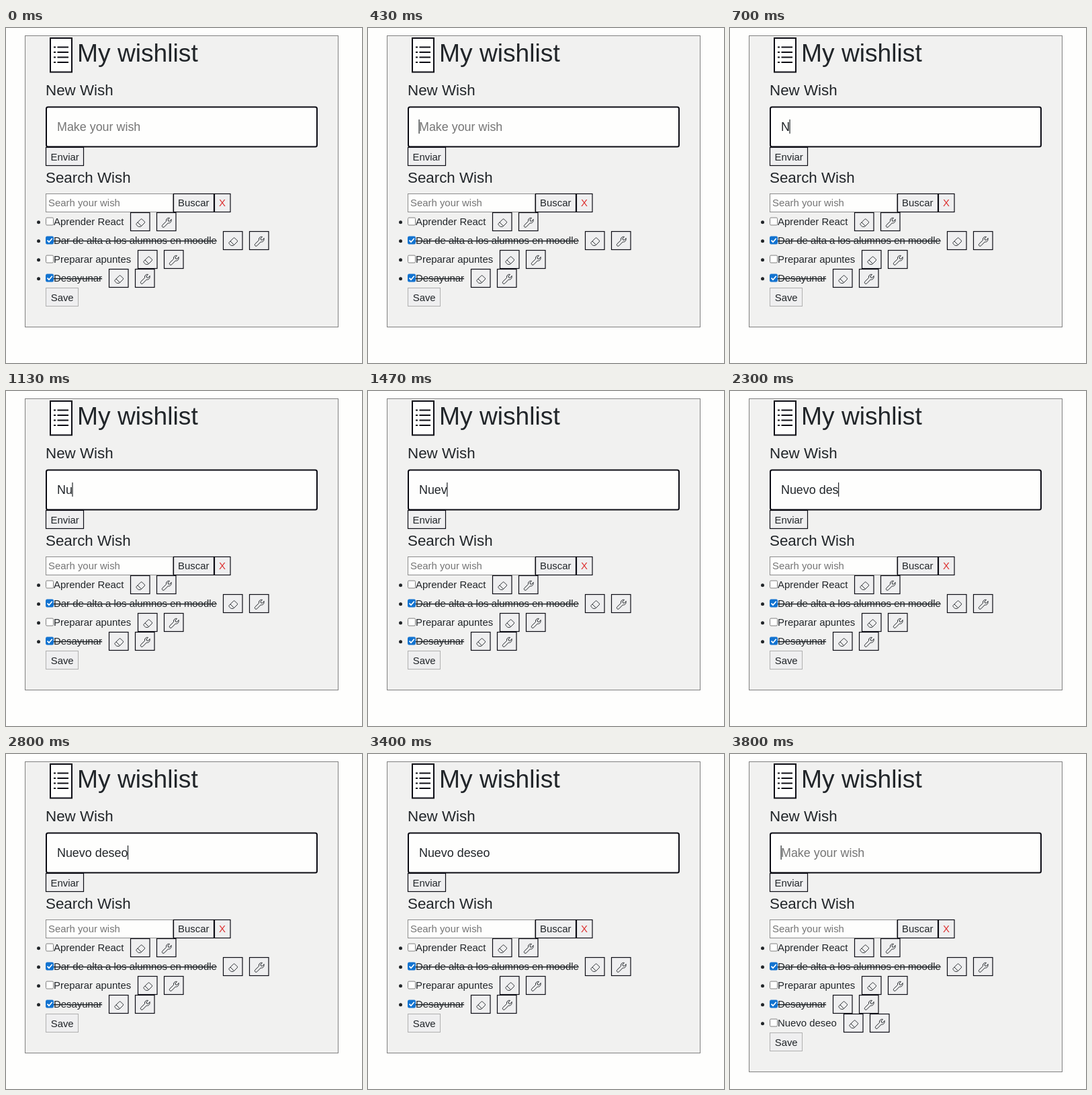
Write an HTML page that moves like this. It is 530 by 498 pixels and loops after 3.83 s.

```html
<!DOCTYPE html>
<html lang="es">
<head>
<meta charset="utf-8">
<title>Wishlist</title>
<style>
html, body { margin: 0; width: 100%; height: 100%; overflow: hidden; background: #fefefd; }
svg { display: block; font: 14.92px "Liberation Sans", Arial, sans-serif; fill: #212529; }
.h1 { font-size: 37.2px; }
.h2 { font-size: 22.35px; }
.big { font-size: 17.9px; }
.hint { fill: #757575; }
.done { text-decoration: line-through; }
.panel { fill: #f1f1f0; stroke: #808080; }
.field { fill: #fefefd; stroke: #8c8c8c; }
.btn { fill: #efeff0; stroke: #0c0c14; stroke-width: 1.2; }
.icon { fill: none; stroke: #212529; stroke-linejoin: round; stroke-linecap: round; }
</style>
</head>
<body>
<svg width="530" height="498" viewBox="0 0 530 498">
  <defs>
    <path id="eraser" class="icon" transform="scale(.93) translate(-8 -8)" d="M8.44 2.56a1.5 1.5 0 0 1 2.12 0l3.88 3.88a1.5 1.5 0 0 1 0 2.12l-5.5 5.5a1.5 1.5 0 0 1-1.06.44H5.12a1.5 1.5 0 0 1-1.06-.44l-2.5-2.5a1.5 1.5 0 0 1 0-2.12ZM3.8 7.9l5.3 5.3"/>
    <path id="wrench" class="icon" d="M6.8-4.4L4.4-2 2.3-2.4 1.9-4.5 4.3-6.9C1.5-7.6-1.2-5.4-.6-2L-6.3 3.6C-8.1 5.5-5.4 8.2-3.5 6.4L2.1.7C5.4 1.3 7.6-1.6 6.8-4.4Z"/>
  </defs>
  <rect id="panel" class="panel" x="28.5" y="11.5" width="466" height="433"/>
  <rect x="66" y="15" width="32" height="50.5" fill="#fefefd" stroke="#0c0c14" stroke-width="2"/>
  <path d="M71 28.5h3m2.5 0h16.5M71 36h3m2.5 0h16.5M71 43.5h3m2.5 0h16.5M71 51h3m2.5 0h16.5" stroke="#0c0c14" stroke-width="2"/>
  <text class="h1" x="106" y="49.6">My wishlist</text>
  <text class="h2" x="59" y="99.6">New Wish</text>
  <rect x="60" y="117.5" width="403" height="59" rx="2.5" fill="#fefefd" stroke="#0c0c14" stroke-width="2"/>
  <text id="wish" class="big" x="76" y="152.5" xml:space="preserve"></text>
  <rect id="caret" y="136" width="1.2" height="21"/>
  <rect class="btn" x="59.5" y="177.5" width="56" height="27"/>
  <text x="66.5" y="196.8">Enviar</text>
  <text class="h2" x="59" y="229.6">Search Wish</text>
  <rect class="field" x="59.5" y="246.5" width="189" height="27"/>
  <text class="hint" x="63" y="265">Searh your wish</text>
  <rect class="btn" x="249.5" y="246.5" width="60" height="27"/>
  <text x="256" y="265">Buscar</text>
  <rect class="btn" x="310.5" y="246.5" width="23.5" height="27"/>
  <text x="317" y="265" style="fill:#dc3030">X</text>
  <g id="save">
    <rect x="59.5" y="386.5" width="48" height="27" fill="#efeff0" stroke="#b0b0b0"/>
    <text x="66.7" y="405.5">Save</text>
  </g>
  <g id="list"></g>
</svg>
<script>
const $ = id => document.getElementById(id);
const LOOP = 3830, ROW = 28, SENT = 3650, BLINK = 500;
const NEW = 'Nuevo deseo';
// Two slow first keys, then a steady rhythm.
const keyTime = i => i < 2 ? 600 + 380 * i : 1150 + 185 * (i - 2);
const wishes = [
  ['Aprender React'],
  ['Dar de alta a los alumnos en moodle', true],
  ['Preparar apuntes'],
  ['Desayunar', true],
  [NEW]
];

const button = (x, icon) =>
  `<rect class="btn" x="${x}" y="274.5" width="28.5" height="27"/>
   <use href="#${icon}" x="${x + 14.7}" y="289.3"/>`;

function addRow([label, done], i) {
  const row = document.createElementNS('http://www.w3.org/2000/svg', 'g');
  $('list').append(row);
  row.setAttribute('transform', `translate(0 ${i * ROW})`);
  row.innerHTML = `<circle cx="48.5" cy="288.8" r="2.5"/>
    <rect x="59.5" y="282" width="11" height="11" rx="1.5"
      fill="${done ? '#1273d0' : '#fefefd'}" stroke="${done ? '#1273d0' : '#808080'}"/>
    ${done ? '<path d="M61.5 287.7l2.5 2.5 4.8-5.4" fill="none" stroke="#fff" stroke-width="1.7"/>' : ''}
    <text x="71" y="293.3" class="${done ? 'done' : ''}">${label}</text>`;
  const x = Math.floor(81.2 + row.querySelector('text').getComputedTextLength()) + .5;
  row.innerHTML += button(x, 'eraser') + button(x + 39, 'wrench');
  return row;
}
const newRow = wishes.map(addRow).pop();

function draw(t) {
  const sent = t >= SENT;
  const typed = sent ? 0 : [...NEW].filter((_, i) => keyTime(i) <= t).length;
  const wish = $('wish');
  wish.textContent = typed ? NEW.slice(0, typed) : 'Make your wish';
  wish.classList.toggle('hint', !typed);

  // The caret restarts its blink after each key.
  const since = t - (sent ? SENT : typed ? keyTime(typed - 1) : -BLINK * 1.5);
  $('caret').style.display = since % (2 * BLINK) < BLINK ? '' : 'none';
  $('caret').setAttribute('x', typed ? 75.5 + wish.getComputedTextLength() : 75.5);

  newRow.style.display = sent ? '' : 'none';
  $('panel').setAttribute('height', sent ? 433 + ROW : 433);
  $('save').setAttribute('transform', `translate(0 ${sent ? ROW : 0})`);
}

const start = performance.now();
function tick() {
  draw((performance.now() - start) % LOOP);
  requestAnimationFrame(tick);
}
tick();
</script>
</body>
</html>
```
